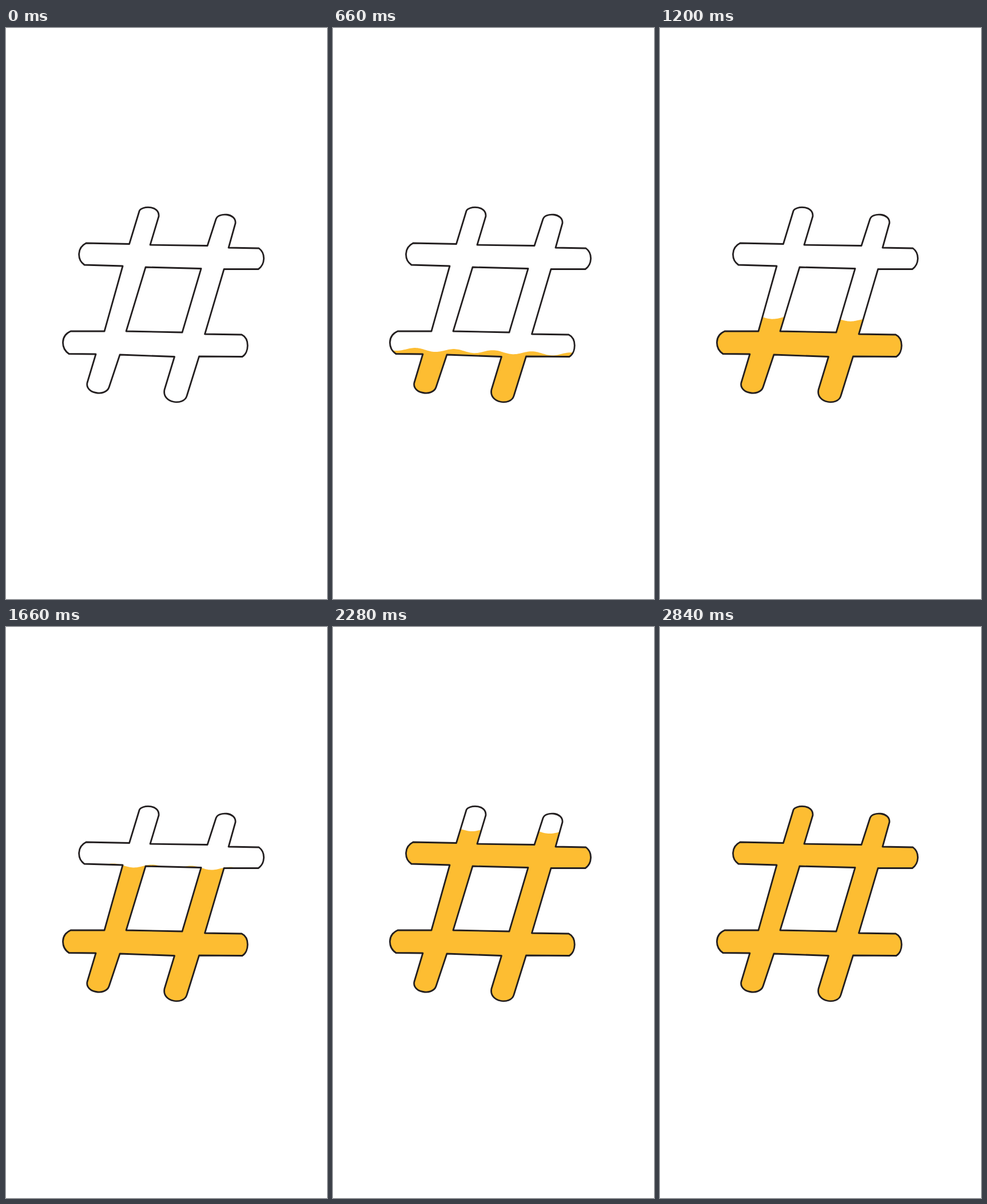
Write an HTML page that moves like this. It is 561x998 px and loops after 2.98 s.

```html
<!DOCTYPE html>
<html lang="en">
<head>
<meta charset="utf-8">
<title>Filling hash</title>
<style>
  html, body { margin: 0; width: 100%; height: 100%; overflow: hidden; background: #fff; }
  svg { display: block; width: 100%; height: 100%; }
</style>
</head>
<body>
<svg viewBox="0 0 561 998">
  <defs>
    <path id="hash" d="M215.500 377.500L233 320C236 311 268 309 267 329L252 379L352 380.500
      L367 334C371 322 402 323 401 341L389 384L442 385C454 394 453 413 441 421.500
      L381 421.500L347.500 535L412 536C426 543 425 567 413 574.500L337.500 574
      L316 643C311 661 272 656 277 632L294.500 574.500L199 571L180 628
      C174 645 138 639 142 620L157 570L110 569.500C96 560 95 538 113 530L172 530
      L204 416L137 414C124 405 124 384 140 376Z
      M244 418L341 420.500L308 532L210 530Z"/>
    <clipPath id="inside"><use href="#hash" clip-rule="evenodd"/></clipPath>
  </defs>
  <g id="figure">
    <g clip-path="url(#inside)"><path id="liquid" fill="#fdbd32"/></g>
    <use href="#hash" fill="none" stroke="#231f20" stroke-width="2.8" stroke-linejoin="round"/>
  </g>
</svg>
<script>
const LOOP = 2980, STEP = 20;
const POP = { from: 2540, to: 2840, scale: 1.036, x: 275.5, y: 483 };

// Mean liquid height over time: quick in the legs, slow in the wide bars.
const levels = [[0, 656], [660, 566], [1200, 508], [1660, 419], [1960, 397], [2280, 355], [2500, 309]];

function levelAt(t) {
  const i = Math.max(1, levels.findIndex(([time]) => time > t));
  if (t >= levels[levels.length - 1][0]) return levels[levels.length - 1][1];
  const [t0, y0] = levels[i - 1], [t1, y1] = levels[i];
  return y0 + (y1 - y0) * (t - t0) / (t1 - t0);
}

// The surface tilts slightly and sags in the middle of each slanted leg.
function liquidPath(level) {
  const legX = 196 + (507 - level) * 0.3, legGap = 136;
  let d = "M90 670";
  for (let x = 90; x <= 462; x += 2) {
    const tilt = (x - 275) * 0.03;
    const sag = 3 * Math.cos((x - legX) / legGap * 4 * Math.PI);
    d += `L${x} ${(level + tilt + sag).toFixed(2)}`;
  }
  return d + "L462 670Z";
}

const liquid = document.getElementById("liquid");
const figure = document.getElementById("figure");

function draw(now) {
  const t = Math.floor((now % LOOP) / STEP) * STEP;
  const scale = t >= POP.from && t < POP.to ? POP.scale : 1;
  liquid.setAttribute("d", liquidPath(levelAt(t)));
  figure.setAttribute("transform",
    `translate(${POP.x} ${POP.y}) scale(${scale}) translate(${-POP.x} ${-POP.y})`);
}

const start = performance.now();
function tick() {
  draw(performance.now() - start);
  requestAnimationFrame(tick);
}
tick();
</script>
</body>
</html>
```
